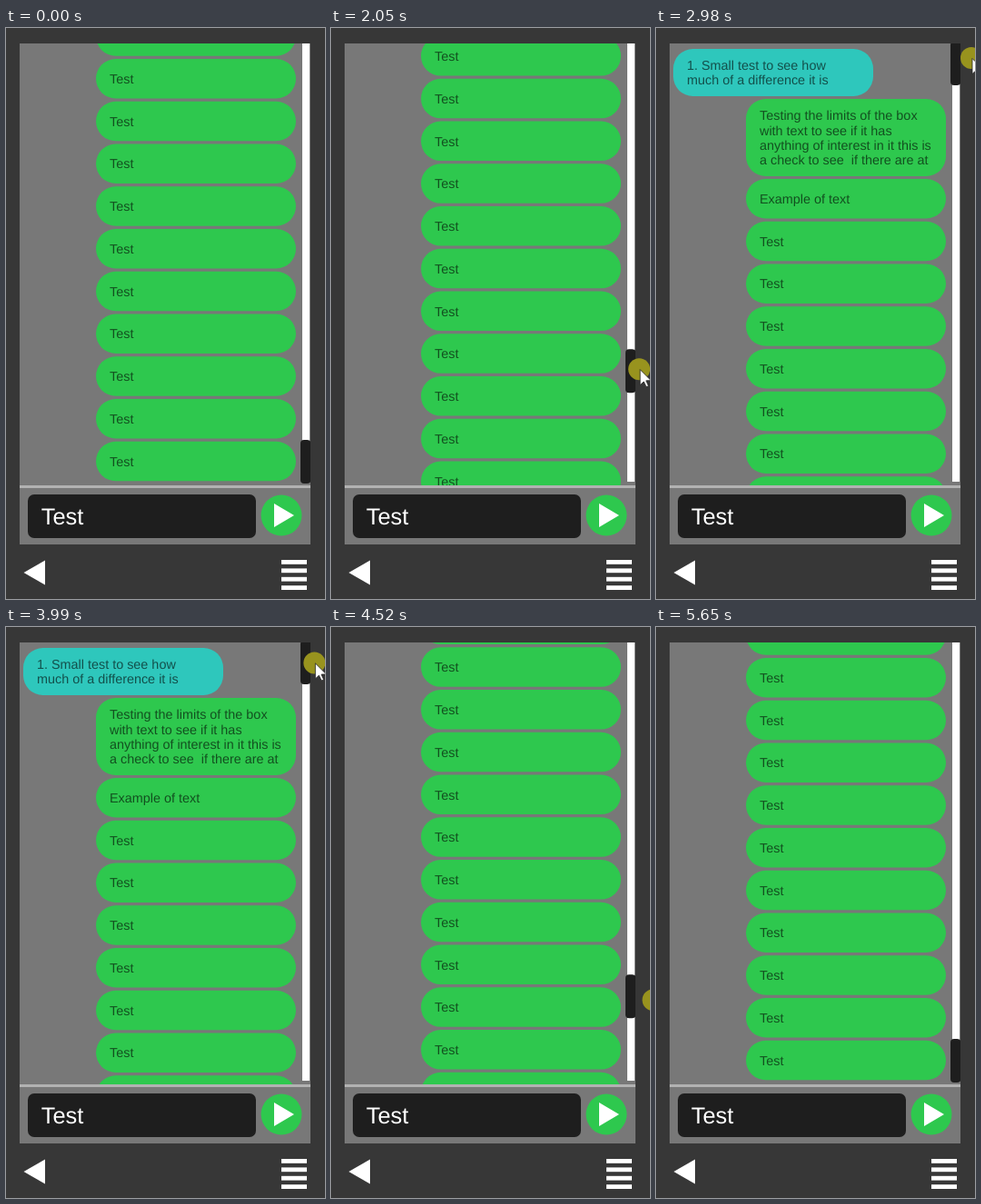
An HTML page with a canvas for the animation above (6650 ms loop, 351 px wide and 628 px high).

```html
<!DOCTYPE html>
<html lang="en">
<head>
<meta charset="utf-8">
<title>Chat scroll</title>
<style>
html, body { margin: 0; width: 100%; height: 100%; overflow: hidden; background: #373737; }
canvas { display: block; }
</style>
</head>
<body>
<canvas id="stage" width="351" height="628"></canvas>
<script>
const ctx = document.getElementById('stage').getContext('2d');
const LOOP = 6650, STEP = 66.5;
const GREEN = '#2ec84e', TEAL = '#2ec7bc', DARK = '#1e1e1e', WHITE = '#fff';
const TOP = 15, BOTTOM = 453, MAX_SCROLL = 506;
const ROW = 46.75, ROW_H = 43.5, FIRST_ROW = 234.5, ROWS = 17;
const FONT = '"Liberation Sans", Arial, sans-serif';

// Pointer moves, timed in steps; bow bends the path sideways,
// grip is the distance from the handle's top while it is dragged.
const enter = { start: 8.5, length: 5.5, from: { x: 352, y: 503 }, to: { x: 329, y: 484 } };
const dragUp = {
  start: 25.67, length: 16.67, from: enter.to, to: { x: 348, y: 33 },
  bow: 10, skew: 1.3, grip: 22
};
const dragDown = {
  start: 59.13, length: 12.9, from: dragUp.to, to: { x: 365, y: 524 },
  bow: -10.8, skew: 0.5, grip: 28
};
const leave = { start: 77.5, length: 8, from: { x: 354, y: 538 }, to: { x: 312, y: 632 } };
const moves = [leave, dragDown, dragUp, enter];

const clamp = (v, lo, hi) => Math.min(hi, Math.max(lo, v));
const lerp = (a, b, u) => a + (b - a) * u;
const smooth = u => u * u * (3 - 2 * u);

function pointerAt(k) {
  const move = moves.find(m => k >= m.start);
  if (!move) return null;
  const { start, length, from, to, bow = 0, skew = 1, grip = 0 } = move;
  const u = clamp((k - start) / length, 0, 1), e = smooth(u);
  return {
    x: lerp(from.x, to.x, e) + bow * Math.sin(Math.PI * u ** skew),
    y: lerp(from.y, to.y, e),
    grip
  };
}

function rect(x, y, w, h, fill) {
  ctx.fillStyle = fill;
  ctx.fillRect(x, y, w, h);
}

function round(x, y, w, h, r, fill) {
  ctx.fillStyle = fill;
  ctx.beginPath();
  ctx.roundRect(x, y, w, h, r);
  ctx.fill();
}

function disc(x, y, r, fill) {
  ctx.fillStyle = fill;
  ctx.beginPath();
  ctx.arc(x, y, r, 0, Math.PI * 2);
  ctx.fill();
}

function poly(points, fill) {
  ctx.fillStyle = fill;
  ctx.beginPath();
  points.forEach(([x, y]) => ctx.lineTo(x, y));
  ctx.closePath();
  ctx.fill();
}

function text(str, x, y, size, fill) {
  ctx.font = size + 'px ' + FONT;
  ctx.fillStyle = fill;
  ctx.fillText(str, x, y);
}

function bubble(x, y, h, fill, lines) {
  round(x, y, 220, h, 21.75, fill);
  const base = y + h / 2 + 5.2 - (lines.length - 1) * 8.1;
  lines.forEach((line, i) => text(line, x + 15, base + i * 16.2, 14.4, 'rgba(0,0,0,.6)'));
}

function messages(scroll) {
  ctx.save();
  ctx.translate(0, -scroll);
  bubble(19, 23, 52, TEAL, ['1. Small test to see how', 'much of a difference it is']);
  bubble(99, 78, 85, GREEN, [
    'Testing the limits of the box',
    'with text to see if it has',
    'anything of interest in it this is',
    'a check to see  if there are at'
  ]);
  for (let i = -1; i < ROWS; i++) {
    const y = FIRST_ROW + i * ROW - ROW_H / 2;
    bubble(99, y, ROW_H, GREEN, [i < 0 ? 'Example of text' : 'Test']);
  }
  ctx.restore();
}

function controls() {
  rect(15, 503, 320, 3, '#b2b2b2');
  round(24, 513, 251, 48, 7, DARK);
  text('Test', 38.7, 546, 25.4, WHITE);
  disc(303, 536, 22.5, GREEN);
  poly([[295, 523], [317, 536], [295, 549]], WHITE);
  poly([[19.5, 599], [43, 585.5], [43, 612.5]], WHITE);
  for (let i = 0; i < 4; i++) rect(303, 585 + i * 9.4, 28, 4.8, WHITE);
}

function arrow(x, y) {
  ctx.save();
  ctx.translate(x, y);
  poly([[0, 0], [0, 17], [4, 13.3], [6.8, 19], [9.2, 18], [6.6, 12.2], [12, 12]], WHITE);
  ctx.strokeStyle = '#222';
  ctx.lineWidth = 0.8;
  ctx.stroke();
  ctx.restore();
}

function draw(t) {
  const pointer = pointerAt(Math.floor(t / STEP + 0.2));
  const dragging = pointer && pointer.grip > 0;
  const handle = dragging ? clamp(pointer.y - pointer.grip, TOP, BOTTOM) : BOTTOM;

  rect(0, 0, 351, 628, '#373737');
  rect(15, 17, 320, 551, '#787878');

  ctx.save();
  ctx.beginPath();
  ctx.rect(15, 17, 320, 486);
  ctx.clip();
  messages((handle - TOP) / (BOTTOM - TOP) * MAX_SCROLL);
  rect(326, 17, 8, 482, WHITE);
  round(324, handle, 11.5, 48, 4, DARK);
  ctx.restore();

  controls();
  if (dragging) disc(pointer.x - 1, pointer.y, 12, '#98931e');
  if (pointer) arrow(pointer.x, pointer.y + 0.5);
}

ctx.fontKerning = 'normal';
ctx.textRendering = 'geometricPrecision';
const start = performance.now();
function tick() {
  draw((performance.now() - start) % LOOP);
  requestAnimationFrame(tick);
}
tick();
</script>
</body>
</html>
```
